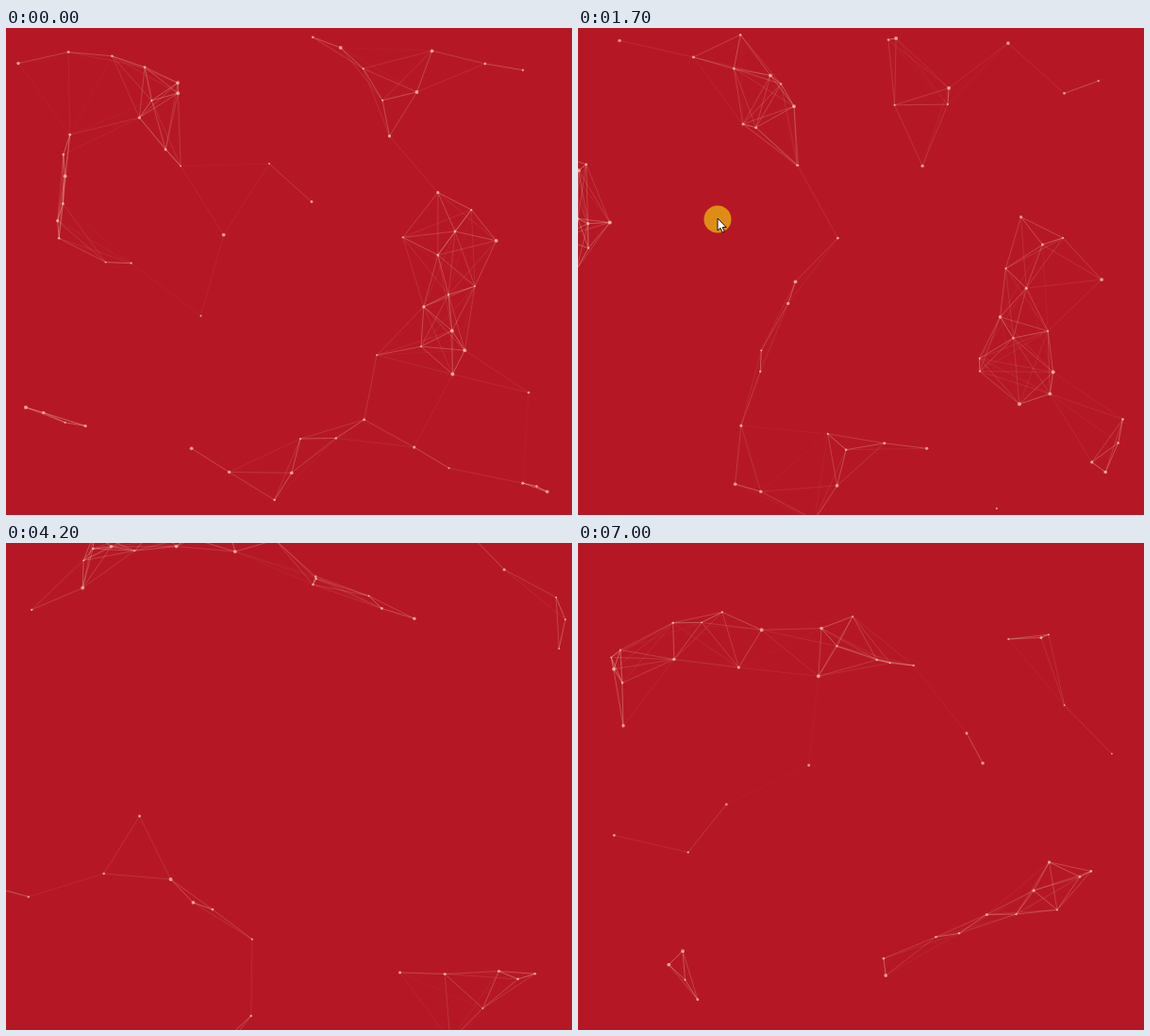
An HTML page with a canvas that plays this animation: 600 by 517 pixels, repeating every 7100 ms.

```html
<!DOCTYPE html>
<html lang="en">
<head>
<meta charset="utf-8">
<title>Particle network</title>
<style>
html, body { margin: 0; width: 100%; height: 100%; overflow: hidden; background: #b51824; }
canvas { display: block; }
</style>
</head>
<body>
<canvas id="stage" width="600" height="517"></canvas>
<script>
const W = 600, H = 517, LOOP = 7100, STEP = 100;
const LINK = 102;                  // longest line between two dots
const SWEEP = 1700, CLEAR = 3400;  // the pointer crosses the stage between these
const REST = 5000;                 // time at which the late strands are laid out
const ctx = document.getElementById('stage').getContext('2d');

let seed = 7;
function random() {
  seed = (seed * 16807) % 2147483647;
  return seed / 2147483647;
}
const spread = s => (random() * 2 - 1) * s;
const mix = (a, b, k) => a + (b - a) * k;
const clamp = k => Math.max(0, Math.min(1, k));

// Point at k (0 to 1) along a polyline, corners evenly spaced.
function along(path, k) {
  const u = k * (path.length - 1), i = Math.min(Math.floor(u), path.length - 2);
  return [0, 1].map(c => mix(path[i][c], path[i + 1][c], u - i));
}

// n dots scattered along a path, drifting together with small differences.
function strand(n, scatter, [vx, vy], ...path) {
  return Array.from({ length: n }, (_, i) => {
    const [x, y] = along(path, i / (n - 1));
    return {
      x: x + spread(scatter), y: y + spread(scatter),
      vx: vx + spread(16), vy: vy + spread(16),
      r: .9 + random() * 1.1
    };
  });
}

const early = [
  strand(10, 9, [25, -5], [22, 30], [120, 27], [190, 60], [140, 90], [185, 148]),
  strand(8, 12, [-40, 5], [71, 117], [66, 163], [50, 215], [135, 258]),
  strand(4, 2, [-20, 15], [206, 307], [229, 218], [278, 145], [326, 184]),
  strand(9, 6, [-10, 10], [323, 13], [377, 38], [410, 114], [456, 22], [551, 42]),
  strand(15, 6, [5, 20], [459, 170], [522, 220], [420, 219], [497, 271],
    [446, 294], [492, 339], [399, 346], [555, 385]),
  strand(9, 5, [-25, 10], [474, 470], [383, 420], [317, 441], [280, 498], [195, 445]),
  strand(4, 2, [20, -10], [19, 403], [83, 424]),
  strand(3, 2, [0, -25], [547, 483], [575, 492])
].flat();

const late = [
  strand(19, 22, [-5, 40], [40, 85], [86, 17], [206, 25], [304, 38], [423, 129]),
  strand(5, 4, [-18, 28], [482, 25], [560, 69], [584, 148]),
  strand(5, 6, [25, -25], [1, 220], [17, 387], [95, 345], [174, 270]),
  strand(4, 3, [-38, 24], [150, 381], [217, 431]),
  strand(4, 6, [45, -40], [222, 530], [301, 480]),
  strand(7, 6, [4, -36], [425, 437], [520, 425], [557, 432], [465, 493])
].flat();

// Pointer way points: from the left edge, up and across, out at the right.
const route = [
  [900, -25, 500], [1000, 17, 480], [SWEEP, 148, 203],
  [2600, 395, 200], [CLEAR, 576, 306], [3700, 645, 335]
];

function pointerAt(t) {
  const i = route.findIndex(p => p[0] > t);
  if (i < 1) return null;
  const [t0, x0, y0] = route[i - 1], [t1, x1, y1] = route[i];
  const k = (t - t0) / (t1 - t0);
  return { x: mix(x0, x1, k), y: mix(y0, y1, k) };
}

function repel(dots, c, t) {
  const R = mix(106, 160, clamp((t - SWEEP) / (CLEAR - SWEEP)));
  for (const p of dots) {
    const dx = p.x - c.x, dy = p.y - c.y, d = Math.hypot(dx, dy) || 1;
    if (d >= R) continue;
    const k = (R * .85 + d * .15) / d;
    p.x = c.x + dx * k;
    p.y = c.y + dy * k;
  }
}

// Each dot heads for the closest free late place; the rest leave the stage.
function setGoals(dots) {
  const s = (CLEAR - REST) / 1000;
  const goals = late.map(g => ({ ...g, x: g.x + g.vx * s, y: g.y + g.vy * s }));
  const pairs = dots.flatMap(p => goals.map(g => ({ p, g, d: Math.hypot(p.x - g.x, p.y - g.y) })));
  const taken = new Set();
  for (const { p, g } of pairs.sort((a, b) => a.d - b.d)) {
    if (p.goal || taken.has(g)) continue;
    p.goal = g;
    taken.add(g);
  }
  for (const p of dots) {
    if (p.goal) continue;
    const a = Math.atan2(p.y - H / 2, p.x - W / 2);
    p.goal = { x: p.x + 450 * Math.cos(a), y: p.y + 450 * Math.sin(a), vx: 0, vy: 0, r: p.r };
  }
}

function move(p, t) {
  if (t > SWEEP && t <= CLEAR) {
    const k = STEP / (CLEAR - t + STEP);
    for (const key of ['x', 'y', 'r']) p[key] = mix(p[key], p.goal[key], k);
    return;
  }
  const v = p.goal || p;
  p.x += v.vx * STEP / 1000;
  p.y += v.vy * STEP / 1000;
}

// Run one loop ahead of time, so that a picture depends on the time alone.
function simulate() {
  const dots = early.map(p => ({ ...p })), frames = [];
  for (let t = 0; t < LOOP; t += STEP) {
    if (t) dots.forEach(p => move(p, t));
    const c = pointerAt(t);
    if (c) repel(dots, c, t);
    if (t === SWEEP) setGoals(dots);
    frames.push({ c, dots: dots.map(({ x, y, r }) => ({ x, y, r })) });
  }
  return frames;
}

function disc(x, y, r) {
  ctx.beginPath();
  ctx.arc(x, y, r, 0, 2 * Math.PI);
  ctx.fill();
}

const arrow = new Path2D('M0 0V13L3 10.3L5.2 15L7.2 14L5.2 9.6H9.2Z');
function drawPointer({ x, y }) {
  ctx.fillStyle = '#de8d14';
  disc(x, y, 14.5);
  ctx.save();
  ctx.translate(x, y - 1);
  ctx.fillStyle = '#fff';
  ctx.fill(arrow);
  ctx.strokeStyle = '#111';
  ctx.lineWidth = 1;
  ctx.stroke(arrow);
  ctx.restore();
}

function draw({ dots, c }) {
  ctx.fillStyle = '#b51824';
  ctx.fillRect(0, 0, W, H);
  ctx.lineWidth = .8;
  dots.forEach((p, i) => {
    for (const q of dots.slice(i + 1)) {
      const d = Math.hypot(p.x - q.x, p.y - q.y);
      if (d >= LINK) continue;
      ctx.strokeStyle = `rgba(255,222,208,${.54 * (1 - d / LINK)})`;
      ctx.beginPath();
      ctx.moveTo(p.x, p.y);
      ctx.lineTo(q.x, q.y);
      ctx.stroke();
    }
  });
  ctx.fillStyle = 'rgba(255,215,195,.68)';
  for (const p of dots) disc(p.x, p.y, p.r);
  if (c) drawPointer(c);
}

const frames = simulate();
const start = performance.now();
function tick() {
  const t = (performance.now() - start) % LOOP;
  draw(frames[Math.floor(t / STEP)]);
  requestAnimationFrame(tick);
}
tick();
</script>
</body>
</html>
```
